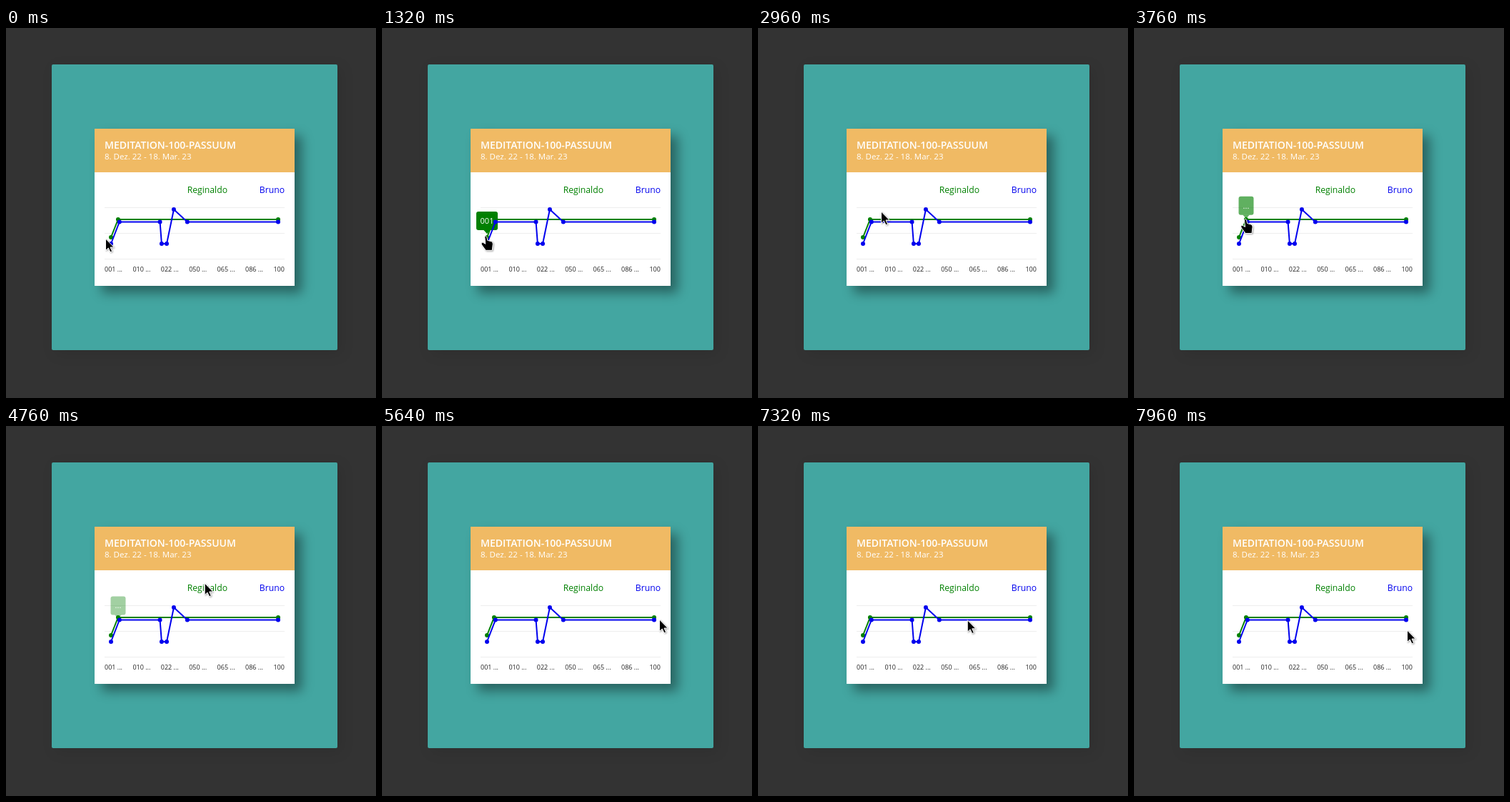
Write an HTML page that moves like this. It is 518 px wide and 518 px high and loops after 8000 ms.

```html
<!DOCTYPE html>
<html lang="en">
<head>
<meta charset="utf-8">
<title>Chart tooltips</title>
<style>
  html, body { margin: 0; height: 100%; overflow: hidden; background: #333; }
  div { position: absolute; }
  .panel { left: 64px; top: 51px; width: 400px; height: 400px; border-radius: 2px;
           background: #43a6a1; box-shadow: 5px 5px 20px rgba(0,0,0,.1); }
  .card { left: 124px; top: 141px; width: 280px; height: 220px;
          background: #fff; box-shadow: 10px 10px 15px rgba(0,0,0,.4); }
  .head { width: 280px; height: 61px; background: #f0ba64; }
  svg { position: absolute; left: 0; top: 0; font-family: "Open Sans", sans-serif; }
  .title { font-size: 14px; font-weight: 600; fill: #fff; }
  .date { font-size: 11.5px; fill: #fff; }
  .name { font-size: 12.2px; text-anchor: end; }
  .axis { font-size: 9px; fill: #222; }
  .tip { font-size: 11px; text-anchor: middle; fill: #fff; }
  #cursor { stroke: #fff; stroke-linejoin: round; filter: drop-shadow(1px 1px 1px rgba(0,0,0,.35)); }
</style>
</head>
<body>
<div class="panel"></div>
<div class="card"><div class="head"></div></div>
<svg width="518" height="518">
  <text class="title" x="138" y="169">MEDITATION-100-PASSUUM</text>
  <text class="date" x="138" y="184">8. Dez. 22 - 18. Mar. 23</text>
  <text class="name" x="310" y="231" fill="green">Reginaldo</text>
  <text class="name" x="390" y="231" fill="#00e">Bruno</text>
  <path d="M138 251.5H390M138 287.5H390M138 323.5H390" stroke="#eee"/>
  <g id="axis" class="axis"></g>
  <g id="green"></g>
  <g id="tips" class="tip"></g>
  <g id="blue"></g>
  <g id="cursor">
    <path id="arrow" d="M-.5 0V16.5L3.3 13 6 18.8 8.6 17.6 6 12H11.2Z"/>
    <path id="hand" d="M-1.5 1.5Q0-1 1.5 1.5L2.5 6.5 8 8Q10 8.5 10 11.5L9 20.5H0L-5.5 13Q-7.5 9-4 9.3L-.5 11.5Z"/>
  </g>
</svg>
<script>
const $ = id => document.getElementById(id);
const dayX = day => 147 + day * 234 / 99;

["001 ...", "010 ...", "022 ...", "050 ...", "065 ...", "086 ...", "100"].forEach((s, i) => {
  $("axis").innerHTML += `<text x="${138 + i * 39.4}" y="341">${s}</text>`;
});

// Points are [day, y]
function series(id, color, data) {
  const pts = data.map(([day, y]) => [dayX(day), y]);
  $(id).innerHTML =
    `<polyline points="${pts.join(" ")}" fill="none" stroke="${color}" stroke-width="2"/>` +
    pts.map(([x, y]) => `<circle cx="${x}" cy="${y}" r="3" fill="${color}"/>`).join("");
}
const level = 271.4;
series("green", "green", [[0, 293], [4.2, 268], [99, 268]]);
series("blue", "#00e", [[0, 302], [5, level], [29, level], [30, 302], [33, 302],
                        [37.2, 254], [45.2, level], [99, level]]);

// The hand shows from on to off; the tooltip fades in from show
const tips = [
  { x: 147, y: 293, s: "001", w: 30, on: 800, show: 500, off: 2080 },
  { x: 157, y: 268, s: "...", w: 21, on: 3640, show: 3645, off: 4600 },
  { x: 381, y: 268, s: "100", w: 31, on: 5720, show: 5740, off: 6880 }
];
$("tips").innerHTML = tips.map(({ x, y, s, w }) =>
  `<g><rect x="${x - w / 2}" y="${y - 36}" width="${w}" height="26" rx="3" fill="green"/>
   <path d="M${x - 5} ${y - 10.5}h10l-5 5.5z" fill="green"/>
   <text x="${x}" y="${y - 19}">${s}</text></g>`).join("");

// Pointer moves: from, to (ms), then the place reached
const moves = [
  [80, 160, 140, 294], [760, 800, 145, 292], [1280, 1560, 147, 284],
  [1680, 1920, 157, 258], [2040, 2360, 192, 241], [2360, 2600, 212, 236],
  [2600, 2880, 178, 255], [2880, 3200, 158, 263], [3600, 3640, 156, 267],
  [4560, 4720, 250, 211], [4720, 4840, 336, 238], [5080, 5480, 389, 271],
  [5640, 5760, 377, 261], [6880, 7160, 267, 265], [7160, 7680, 354, 287],
  [7680, 7960, 383, 286]
];

const part = (t, a, b) => Math.max(0, Math.min(1, (t - a) / (b - a)));
const fade = (t, a) => 1 - (1 - part(t, a, a + 300)) ** 2;

function draw(now) {
  const t = Math.floor(now % 8000 / 40) * 40;

  tips.forEach((p, i) => {
    const a = t < p.on ? 0 : fade(t, p.show) * (1 - fade(t, p.off + 40));
    const g = $("tips").children[i];
    g.setAttribute("opacity", a);
    g.setAttribute("transform", `translate(0 ${10 * (1 - a)})`);
  });

  let x = 140, y = 295;
  for (const [a, b, toX, toY] of moves) {
    const u = part(t, a, b);
    x += (toX - x) * u;
    y += (toY - y) * u;
  }
  $("cursor").setAttribute("transform", `translate(${x} ${y})`);

  const over = tips.some(p => t >= p.on && t < p.off);
  $("hand").style.display = over ? "" : "none";
  $("arrow").style.display = over ? "none" : "";
}

const start = performance.now();
function tick() {
  draw(performance.now() - start);
  requestAnimationFrame(tick);
}
tick();
</script>
</body>
</html>
```
